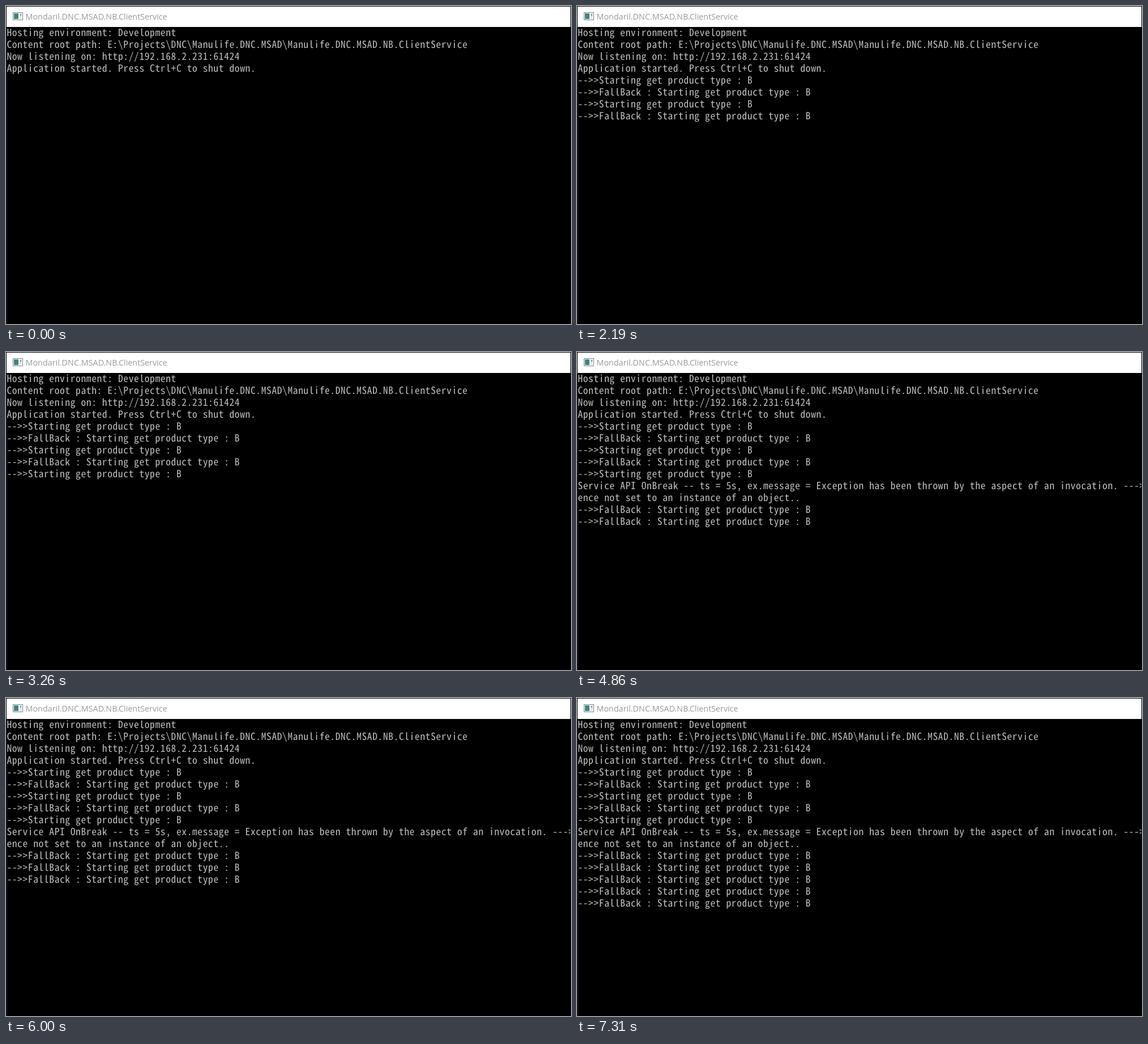
These frames come from a looping animation (998 px wide and 561 px high, 8000 ms). An HTML page:

```html
<!DOCTYPE html>
<html lang="en">
<head>
<meta charset="utf-8">
<title>Console output</title>
<style>
  html, body { margin: 0; width: 100%; height: 100%; overflow: hidden; background: #000; }
  svg { display: block; width: 998px; height: 561px; }

  .title { font: 14.35px "Open Sans", "Noto Sans", sans-serif; fill: #999; }

  /* Every character sits in a 9.36px cell, whatever the font's own advance. */
  .log {
    font: 17.5px "Noto Sans Mono CJK SC", "Noto Sans Mono CJK JP", "Liberation Mono", monospace;
    letter-spacing: calc(9.36px - 1ch);
    text-rendering: geometricPrecision;
    fill: #c0c0c0;
  }

  /* A black cover drops by whole 21px rows to reveal new output. */
  .cover { --row: 21px; animation: reveal 8s step-end infinite; }
  @keyframes reveal {
    0%      { transform: translateY(calc(4 * var(--row))); }
    1.25%   { transform: translateY(calc(6 * var(--row))); }
    27.375% { transform: translateY(calc(8 * var(--row))); }
    40.75%  { transform: translateY(calc(9 * var(--row))); }
    60.25%  { transform: translateY(calc(12 * var(--row))); }
    60.75%  { transform: translateY(calc(13 * var(--row))); }
    75%     { transform: translateY(calc(14 * var(--row))); }
    83.375% { transform: translateY(calc(15 * var(--row))); }
    91.375%, 100% { transform: translateY(calc(16 * var(--row))); }
  }
</style>
</head>
<body>
<svg viewBox="0 0 998 561">
  <rect width="998" height="561"/>

  <text class="log" y="32">
    <tspan x="1.4" dy="21">Hosting environment: Development</tspan>
    <tspan x="1.4" dy="21">Content root path: E:\Projects\DNC\Manulife.DNC.MSAD\Manulife.DNC.MSAD.NB.ClientService</tspan>
    <tspan x="1.4" dy="21">Now listening on: http://192.168.2.231:61424</tspan>
    <tspan x="1.4" dy="21">Application started. Press Ctrl+C to shut down.</tspan>
    <tspan x="1.4" dy="21">--&gt;&gt;Starting get product type : B</tspan>
    <tspan x="1.4" dy="21">--&gt;&gt;FallBack : Starting get product type : B</tspan>
    <tspan x="1.4" dy="21">--&gt;&gt;Starting get product type : B</tspan>
    <tspan x="1.4" dy="21">--&gt;&gt;FallBack : Starting get product type : B</tspan>
    <tspan x="1.4" dy="21">--&gt;&gt;Starting get product type : B</tspan>
    <tspan x="1.4" dy="21">Service API OnBreak -- ts = 5s, ex.message = Exception has been thrown by the aspect of an invocation. ---&gt;</tspan>
    <tspan x="1.4" dy="21">ence not set to an instance of an object..</tspan>
    <tspan x="1.4" dy="21">--&gt;&gt;FallBack : Starting get product type : B</tspan>
    <tspan x="1.4" dy="21">--&gt;&gt;FallBack : Starting get product type : B</tspan>
    <tspan x="1.4" dy="21">--&gt;&gt;FallBack : Starting get product type : B</tspan>
    <tspan x="1.4" dy="21">--&gt;&gt;FallBack : Starting get product type : B</tspan>
    <tspan x="1.4" dy="21">--&gt;&gt;FallBack : Starting get product type : B</tspan>
  </text>
  <rect class="cover" y="37" width="998" height="524"/>

  <!-- Window frame and title bar -->
  <rect x="1" y="37" width="1" height="523" fill="#26263a"/>
  <rect x="997" width="1" height="561"/>
  <rect x="1" y="1" width="996" height="36" fill="#fff"/>
  <g>
    <rect x="12.5" y="11.5" width="17" height="13" fill="#fff" stroke="#7b8288"/>
    <rect x="14" y="13" width="8" height="10" fill="#3f8580"/>
    <rect x="24" y="13" width="4" height="10" fill="#e4e8ea"/>
    <rect x="25" y="14" width="2" height="3" fill="#8a9298"/>
  </g>
  <text class="title" x="34.5" y="23.5">Mondaril.DNC.MSAD.NB.ClientService</text>
</svg>
</body>
</html>
```
